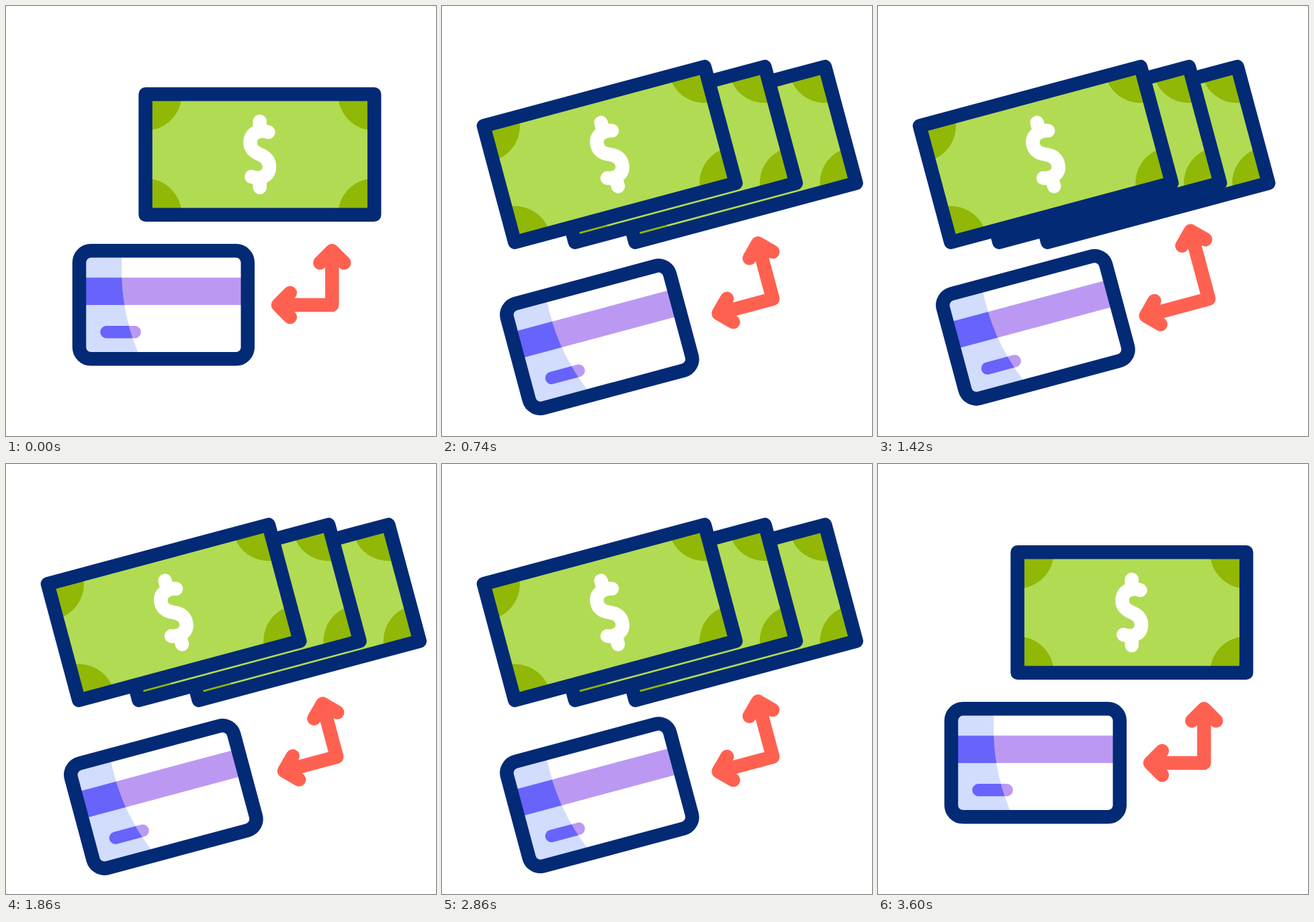
Write an HTML page that moves like this. It is 640 px wide and 640 px high and loops after 3620 ms.

```html
<!DOCTYPE html>
<html lang="en">
<head>
<meta charset="utf-8">
<title>Cash and card</title>
<style>
  html, body { margin: 0; width: 100%; height: 100%; overflow: hidden; background: #fff; }
  svg { display: block; width: 100%; height: 100%; }
</style>
</head>
<body>
<svg viewBox="0 0 640 640">
  <defs>
    <clipPath id="paper"><rect x="207.6" y="131.3" width="340.6" height="179.4"/></clipPath>
    <clipPath id="shade"><path d="M109 364H172.3L172.5 374C170.5 424 177 468 196.5 515.5L200 526H109Z"/></clipPath>
    <g id="marks">
      <rect x="110" y="404.3" width="249" height="40.8"/>
      <rect x="140.3" y="476" width="60.6" height="18.4" rx="9.2"/>
    </g>
    <g id="bill">
      <g clip-path="url(#paper)">
        <rect x="207.6" y="131.3" width="340.6" height="179.4" fill="#b1db53"/>
        <g fill="#91b707">
          <circle cx="207.6" cy="131.3" r="54"/>
          <circle cx="548.2" cy="131.3" r="54"/>
          <circle cx="207.6" cy="310.7" r="54"/>
          <circle cx="548.2" cy="310.7" r="54"/>
        </g>
      </g>
      <rect x="207.6" y="131.3" width="340.6" height="179.4" fill="none" stroke="#032a75" stroke-width="20.5" stroke-linejoin="round"/>
      <path d="M390.4 187.7C380 183.5 363.5 187 363.5 203C363.5 214 371 218 377.8 220.9C385 224 392 229 392 239C392 254.5 377 258.5 365.4 254M377.7 171.8V184M377.7 258V270"
        fill="none" stroke="#fff" stroke-width="20.5" stroke-linecap="round" stroke-linejoin="round"/>
    </g>
  </defs>
  <rect width="640" height="640" fill="#fff"/>
  <use id="back" href="#bill"/>
  <use id="middle" href="#bill"/>
  <use id="front" href="#bill"/>
  <g id="card">
    <rect x="109" y="364.3" width="250.8" height="161" rx="17.5" fill="#fff"/>
    <use href="#marks" fill="#bb99f3"/>
    <g clip-path="url(#shade)">
      <rect x="109" y="364.3" width="250.8" height="161" rx="17.5" fill="#d2dcfd"/>
      <use href="#marks" fill="#6863fb"/>
    </g>
    <rect x="109" y="364.3" width="250.8" height="161" rx="17.5" fill="none" stroke="#032a75" stroke-width="20.5"/>
  </g>
  <path id="arrow" fill="none" stroke="#ff6151" stroke-width="20.5" stroke-linecap="round" stroke-linejoin="round"/>
</svg>
<script>
  const LOOP = 3620, END = 3600;
  const $ = id => document.getElementById(id);
  const [back, middle, front, card, arrow] = ['back', 'middle', 'front', 'card', 'arrow'].map($);

  // Eased value at time t along [time, value] keys.
  function track(keys, t) {
    if (t <= keys[0][0]) return keys[0][1];
    for (let i = 1; i < keys.length; i++) {
      const [a, from] = keys[i - 1], [b, to] = keys[i];
      if (t <= b) {
        const u = (t - a) / (b - a);
        return from + (to - from) * u * u * (3 - 2 * u);
      }
    }
    return keys[keys.length - 1][1];
  }

  const TURN = [[0, 0], [600, 1]];
  const PULSE = [[600, 0], [1200, 1], [1800, 0]];
  const SPREAD = [[240, 0], [600, 184], [640, 184], [1200, 128], [1800, 180]];

  function place(el, dx, dy, angle, cx, cy) {
    el.setAttribute('transform', `translate(${dx} ${dy}) rotate(${angle} ${cx} ${cy})`);
  }

  function arrowPath(up, left) {
    const x = 485.3, y = 445, w = 18;
    const top = y - up, tip = x - left;
    return `M${x} ${top}V${y}H${tip}` +
      `M${x - w} ${top + w}L${x} ${top}L${x + w} ${top + w}` +
      `M${tip + w} ${y - w}L${tip} ${y}L${tip + w} ${y + w}`;
  }

  function draw(now) {
    const time = now % LOOP;
    const t = Math.max(0, Math.min(time, END - time));   // plays forth, then back
    const turn = track(TURN, t), pulse = track(PULSE, t), spread = track(SPREAD, t);
    const angle = -15 * turn, slide = -128.3 * turn;

    [front, middle, back].forEach((el, i) => {
      place(el, slide + spread * i / 2, 0, angle, 377.9, 221);
      el.style.display = i && spread === 0 ? 'none' : '';
    });
    place(card, 0, 51.5 * turn - 26 * pulse, angle, 234.4, 444.8);
    arrow.setAttribute('d', arrowPath(80.8 + 34.5 * pulse, 80.4 + 24 * pulse));
    place(arrow, 0, 0, angle, 454.3, 413.7);
  }

  const start = performance.now();
  function frame() {
    draw(performance.now() - start);
    requestAnimationFrame(frame);
  }
  frame();
</script>
</body>
</html>
```
